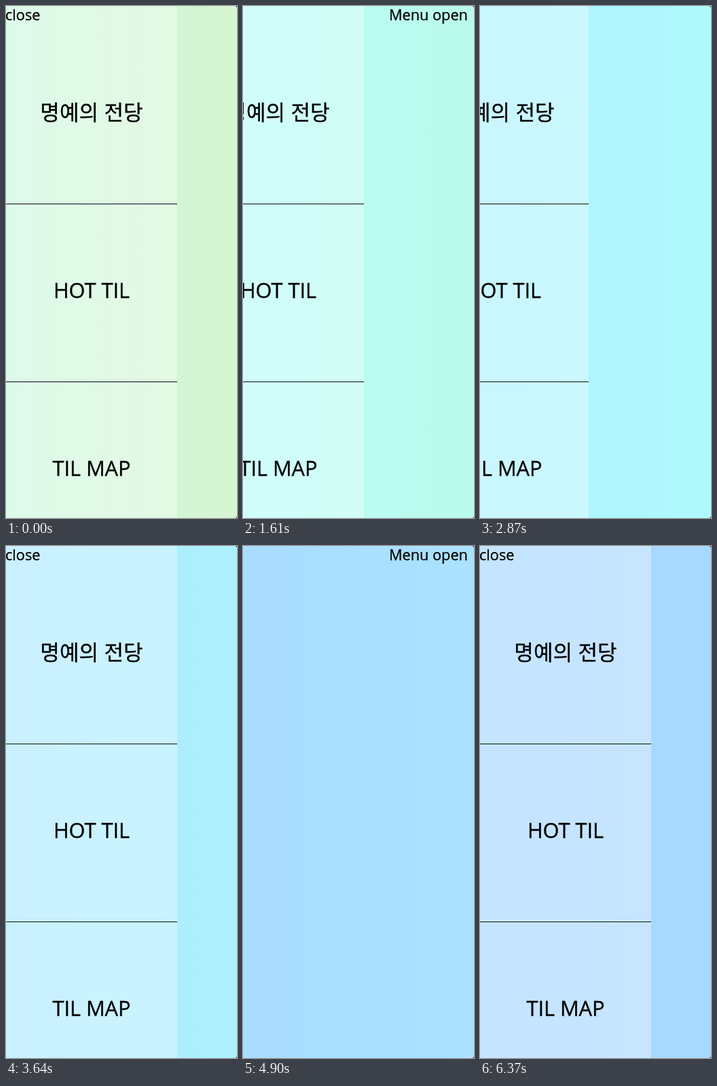
Animation of 340x754 px, one loop 6440 ms. Source, as an HTML page:

```html
<!DOCTYPE html>
<html lang="ko">
<head>
<meta charset="utf-8">
<title>Slide menu</title>
<style>
html, body { margin: 0; width: 100%; height: 100%; overflow: hidden; }
svg { display: block; width: 340px; height: 754px; }
text { font-family: "Open Sans", "Noto Sans CJK KR", "Noto Sans CJK", sans-serif; fill: #000; stroke: #000; stroke-width: .3px; }
.small { font-size: 21.7px; }
.item { font-size: 30.7px; text-anchor: middle; }
.ko { font-family: "Noto Sans CJK KR", "Noto Sans CJK", sans-serif; font-size: 31px; }
</style>
</head>
<body>
<svg viewBox="0 0 340 754">
  <defs><linearGradient id="sky"></linearGradient></defs>
  <rect width="340" height="754" fill="url(#sky)"/>
  <text id="opener" class="small" x="215" y="21">Menu open</text>
  <g id="panel">
    <rect width="252" height="754" fill="#fff" fill-opacity=".34"/>
    <text class="small" x="-1" y="21">close</text>
    <text class="item ko" x="126" y="168">명예의 전당</text>
    <text class="item" x="126" y="430">HOT TIL</text>
    <text class="item" x="126" y="692">TIL MAP</text>
    <path d="M0 291.5H252M0 553.5H252" stroke="#00140f" stroke-width="1"/>
  </g>
  <path d="M337.5 0H340V2.5Q339.5 .5 337.5 0ZM340 751.5V754H337.5Q339.5 753.5 340 751.5Z" fill="#222"/>
</svg>
<script>
const LOOP = 6440, TICK = 70, WIDTH = 340, PANEL = 252;
const SLIDE = 500;      // ms per slide
const DRIFT = 1.9;      // ms of colour lead per pixel to the left
const SETTLE = 5880;    // the backdrop rests from here on
const STEPS = 6;

// [time, r, g, b] at the right edge
const HUES = [
  [0, 214, 245, 210], [1610, 187, 251, 234], [1900, 186, 252, 243],
  [2870, 175, 249, 253], [3640, 173, 240, 254], [4150, 174, 234, 254],
  [4660, 171, 228, 255], [5250, 170, 223, 255], [5880, 168, 216, 255],
  [6630, 167, 212, 255]
];

// [click time, open afterwards]
const CLICKS = [[1510, false], [2686, true], [3862, false], [5000, true]];

const $ = id => document.getElementById(id);
const sky = $("sky"), panel = $("panel"), opener = $("opener");

const stops = Array.from({ length: STEPS + 1 }, (_, i) => {
  const stop = document.createElementNS("http://www.w3.org/2000/svg", "stop");
  stop.setAttribute("offset", i / STEPS);
  return sky.appendChild(stop);
});

function hue(time) {
  let i = 1;
  while (i < HUES.length - 1 && HUES[i][0] < time) i++;
  const a = HUES[i - 1], b = HUES[i];
  const p = Math.min(1, (time - a[0]) / (b[0] - a[0]));
  return `rgb(${[1, 2, 3].map(k => Math.round(a[k] + (b[k] - a[k]) * p))})`;
}

// cubic-bezier(.25, .1, .25, 1)
function ease(x) {
  if (x <= 0) return 0;
  if (x >= 1) return 1;
  const curve = (s, p, q) => 3 * (1 - s) * (1 - s) * s * p + 3 * (1 - s) * s * s * q + s * s * s;
  let lo = 0, hi = 1;
  for (let i = 0; i < 24; i++) {
    const mid = (lo + hi) / 2;
    if (curve(mid, .25, .25) < x) lo = mid; else hi = mid;
  }
  return curve(lo, .1, 1);
}

function draw(time) {
  const base = Math.min(time, SETTLE);
  stops.forEach((stop, i) =>
    stop.setAttribute("stop-color", hue(base + DRIFT * WIDTH * (1 - i / STEPS))));

  let open = true, shown = 1;
  for (const [at, next] of CLICKS) {
    if (time < at) break;
    const p = ease((time - at) / SLIDE);
    open = next;
    shown = next ? p : 1 - p;
  }
  panel.setAttribute("transform", `translate(${Math.round((shown - 1) * PANEL)} 0)`);
  opener.setAttribute("visibility", open ? "hidden" : "visible");
}

let start;
function tick(now) {
  if (start === undefined) start = now;
  const time = (now - start) % LOOP;
  draw(Math.floor(time / TICK) * TICK);
  requestAnimationFrame(tick);
}
draw(0);
requestAnimationFrame(tick);
</script>
</body>
</html>
```
